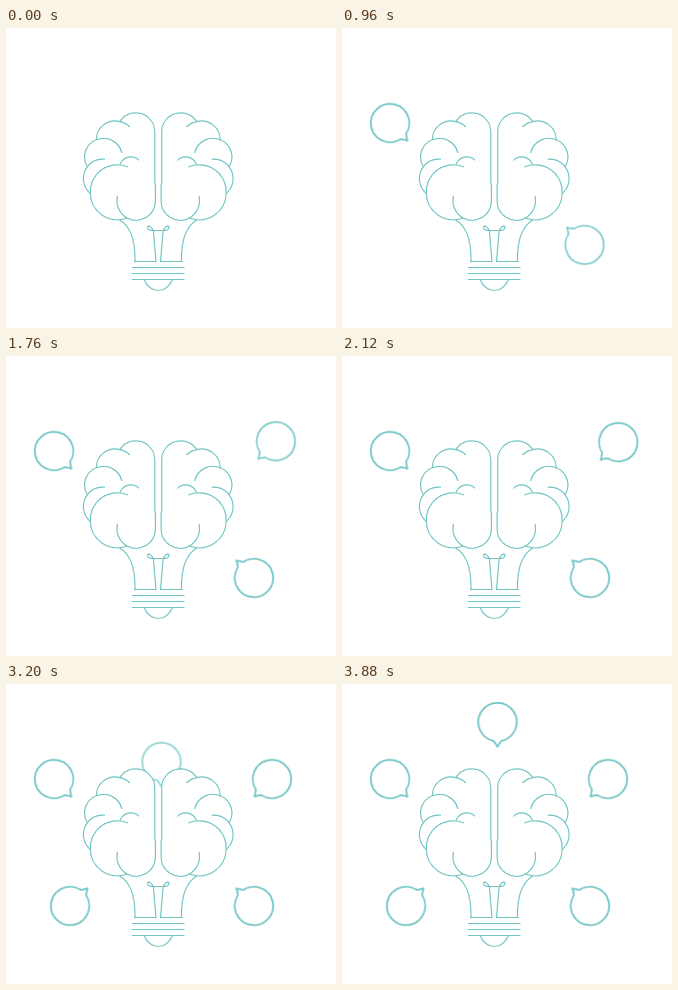
An HTML page for the animation above (4000 ms loop, 330 by 300 pixels).

```html
<!DOCTYPE html>
<html lang="en">
<head>
<meta charset="utf-8">
<title>Brain bulb</title>
<style>
  html, body { margin: 0; width: 100%; height: 100%; overflow: hidden; background: #fff; }
  svg { display: block; width: 330px; height: 300px; }
  svg { fill: none; stroke: #70c4c4; stroke-width: 1.15; stroke-linejoin: round; }
  .solid { fill: #fff; }
  .bubble { stroke-width: 1.75; animation: 4s ease-in-out infinite; }
  .b1 { rotate: -45deg; animation-name: upper-left; }
  .b2 { rotate: 135deg; animation-name: lower-right; }
  .b3 { rotate: 45deg; animation-name: upper-right; }
  .b4 { rotate: -135deg; animation-name: lower-left; }
  .b5 { animation-name: top; }

  @keyframes upper-left {
    0% { translate: 112px 148px; opacity: .5; }
    9% { translate: 43px 90px; opacity: 1; }
    13% { translate: 52px 99px; }
    17%, 100% { translate: 48px 95px; opacity: 1; }
  }
  @keyframes lower-right {
    0%, 18% { translate: 195px 165px; opacity: .5; }
    27.5% { translate: 261px 237px; opacity: 1; }
    34% { translate: 246px 219px; }
    38%, 100% { translate: 248px 222px; opacity: 1; }
  }
  @keyframes upper-right {
    0%, 35% { translate: 195px 135px; opacity: .5; animation-timing-function: linear; }
    39.5% { translate: 228px 105px; animation-timing-function: linear; }
    42% { translate: 246px 100px; opacity: .8; animation-timing-function: ease-out; }
    48.5% { translate: 298px 68px; opacity: 1; }
    53% { translate: 276.5px 86px; animation-timing-function: ease-out; }
    56% { translate: 264.5px 96.5px; }
    59%, 100% { translate: 266px 95px; opacity: 1; }
  }
  @keyframes lower-left {
    0%, 57% { translate: 112px 165px; opacity: .5; animation-timing-function: ease-in; }
    65% { translate: 71.5px 212px; opacity: .8; animation-timing-function: ease-out; }
    68% { translate: 48.5px 237px; opacity: 1; }
    70% { translate: 56px 230px; animation-timing-function: ease-out; }
    74% { translate: 66px 219.5px; }
    78%, 100% { translate: 64px 222px; opacity: 1; }
  }
  @keyframes top {
    0%, 73% { translate: 155.5px 135px; opacity: 0; animation-timing-function: ease-in; }
    80% { translate: 155.5px 78px; opacity: .75; animation-timing-function: linear; }
    84% { translate: 155.5px 47px; opacity: .9; animation-timing-function: ease-out; }
    87% { translate: 155.5px 32px; opacity: 1; }
    91% { translate: 155.5px 39.5px; }
    94%, 100% { translate: 155.5px 38px; opacity: 1; }
  }
</style>
</head>
<body>
<svg viewBox="0 0 330 300">
  <defs>
    <path id="bubble" d="M-4 18.8A19.2 19.2 0 1 1 4 18.8Q1.8 21 0 25Q-1.8 21-4 18.8Z"/>
    <g id="half">
      <!-- neck, filament and cap -->
      <path class="solid" stroke="none" d="M113 191Q129.5 201 129 233.5H150L147 203V180Z"/>
      <path d="M113 191.5C122 197 129.5 207 129 233.5M128 233.5H150L147.4 203C146 200 143 196.5 141.7 198.8C141 201.5 144 202.5 147 202.5H152.25"/>
      <path d="M138 251.5Q143 262.5 152.25 262.5"/>
      <!-- hemisphere -->
      <path class="solid" d="M148.8 103.5A19 19 0 0 0 113.8 93.6A18.7 18.7 0 0 0 90.3 111.8A18.6 18.6 0 0 0 81.3 138.8A19.7 19.7 0 0 0 84.3 165.5A27 27 0 0 0 121 190A19.3 19.3 0 0 0 149.4 173V156H148.8Z"/>
      <path d="M113.8 93.6Q119.5 94.5 124 99M90.3 111.8A18.6 18.6 0 0 1 115.8 125M81.3 138.8A19.7 19.7 0 0 1 99 131.3M84.3 165.5A27 27 0 0 1 122 139M114 136.5A11.5 11.5 0 0 1 133 132.3M121 190A20 20 0 0 1 111.5 168"/>
    </g>
  </defs>
  <use href="#bubble" class="bubble b1"/>
  <use href="#bubble" class="bubble b2"/>
  <use href="#bubble" class="bubble b3"/>
  <use href="#bubble" class="bubble b4"/>
  <use href="#bubble" class="bubble b5"/>
  <use href="#half"/>
  <use href="#half" transform="matrix(-1 0 0 1 304.5 0)"/>
  <path d="M126 239.5H178.5M126 245.5H178.5M126 251.5H178.5" stroke-width="1"/>
</svg>
</body>
</html>
```
